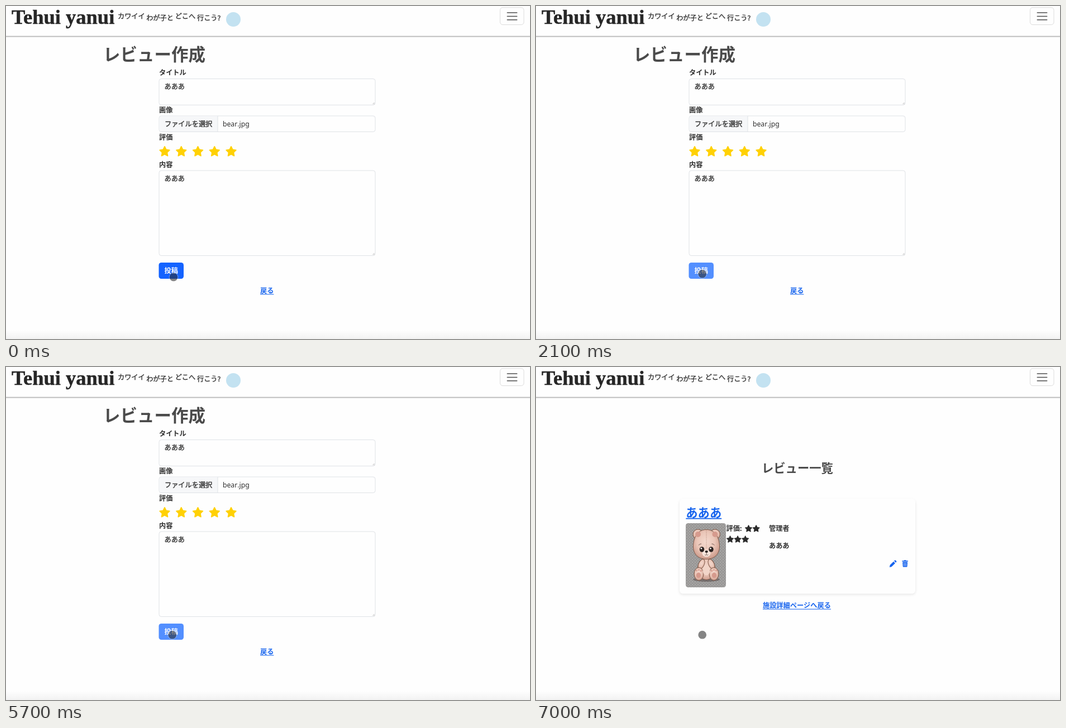
Recreate the animation shown at these times as an HTML page. Size 938x597 px, loop 7100 ms.

```html
<!DOCTYPE html>
<html lang="ja">
<head>
<meta charset="utf-8">
<title>レビュー作成</title>
<style>
html, body { margin: 0; width: 100%; height: 100%; overflow: hidden; background: #fefefe; }
svg { display: block; width: 938px; height: 597px; }
text { font: 500 12.2px "Noto Sans CJK JP", "Noto Sans CJK", "Noto Sans", sans-serif; fill: #303030; font-kerning: none; white-space: pre; }
.r { stroke: #303030; stroke-width: .35px; }
.b { font-weight: 700; }
.h1 { font-size: 30.5px; font-weight: 700; fill: #4a4a4a; }
.h2 { font-size: 21.3px; font-weight: 700; fill: #4a4a4a; }
.link { font-weight: 700; fill: #1764ee; }
.big { font-size: 21.3px; }
.latin { font-family: "Noto Sans", sans-serif; font-weight: 400; }
.logo { font: 700 36.5px "Liberation Serif", serif; fill: #262626; stroke: #262626; stroke-width: .5px; }
.white { font-weight: 700; fill: #fff; }
.box { fill: #fefefe; stroke: #dfe2e6; }
.grip { stroke: #999; stroke-width: .7; fill: none; }
</style>
</head>
<body>
<svg viewBox="0 0 938 597" xmlns="http://www.w3.org/2000/svg">
  <defs>
    <linearGradient id="fade" x2="0" y2="1">
      <stop offset="0" stop-color="#fefefe"/><stop offset="1" stop-color="#f2f2f2"/>
    </linearGradient>
    <filter id="soft" x="-5%" y="-10%" width="110%" height="125%"><feGaussianBlur stdDeviation="2.6"/></filter>
    <pattern id="mesh" width="5" height="5" patternUnits="userSpaceOnUse">
      <rect width="5" height="5" fill="#969594"/>
      <path d="M0 0L5 5M5 0L0 5" stroke="#aeacaa" stroke-width=".9"/>
    </pattern>
    <clipPath id="frame"><rect x="268" y="280" width="72" height="115" rx="4.5"/></clipPath>
    <radialGradient id="fur" cx=".48" cy=".42" r=".62">
      <stop offset="0" stop-color="#f4d9ce"/><stop offset=".55" stop-color="#eac6b8"/><stop offset="1" stop-color="#c99686"/>
    </radialGradient>
  </defs>
  <rect width="938" height="597" fill="#fefefe"/>
  <rect y="581" width="938" height="16" fill="url(#fade)"/>
  <rect y="53.6" width="938" height="2" fill="#bebebe"/>
  <text class="logo" x="10" y="32">Tehui yanui</text>
  <g id="tagline"></g>
  <circle cx="407" cy="24" r="13" fill="#c3e2f1"/>
  <rect x="884.5" y="2.800" width="42.500" height="30.700" rx="4.500" fill="#fefefe" stroke="#dcdcdc"/>
  <path d="M897.300 12h17.400M897.300 18.400h17.400M897.300 24.800h17.400" stroke="#4c4c4c" stroke-width="1.500" stroke-linecap="round"/>

  <g id="form">
    <rect class="box" x="274" y="130.5" width="387" height="47" rx="4"/>
    <rect class="box" x="274" y="197" width="387" height="28.5" rx="4"/>
    <path d="M379 197.5H278a3.5 3.5 0 0 0-3.5 3.5v20.5a3.5 3.5 0 0 0 3.5 3.5h101z" fill="#f6f7f9"/>
    <path d="M379 197v28.5" stroke="#dfe2e6"/>
    <rect class="box" x="274" y="295" width="387" height="152.5" rx="4"/>
    <path class="grip" d="M656.5 176l3-3M658.5 176.3l1.2-1.2M656.5 446l3-3M658.5 446.3l1.2-1.2"/>
    <g id="formText"></g>
    <rect id="button" x="273.5" y="460" width="44.5" height="29" rx="4.5"/>
    <text class="white" x="283.5" y="479.2">投稿</text>
  </g>

  <g id="list">
    <rect x="257" y="238.5" width="422" height="169.5" rx="6" fill="#000" opacity=".1" filter="url(#soft)"/>
    <rect x="257" y="236" width="422" height="170.5" rx="6" fill="#fefefe"/>
    <g id="listText"></g>
    <g fill="#1764ee">
      <path d="M632.800 359l.9-3.900 6.300-6.300 3 3-6.300 6.300zM641 347.800l1.200-1.200q.8-.6 1.600.1l1.300 1.300q.7.800 0 1.600l-1.200 1.200z"/>
      <path d="M655.300 347.200h3l.8-1h3l.8 1h3v1.600h-10.600zM656.200 349.600h8.800l-.5 7.800q-.1 1.200-1.300 1.200h-5.200q-1.200 0-1.300-1.200z"/>
      <path d="M658.600 351.200v5.700M660.600 351.200v5.700M662.600 351.200v5.700" stroke="#fff" stroke-width=".6"/>
    </g>
    <g id="plain"></g>
    <g id="loaded">
      <g clip-path="url(#frame)">
        <rect x="268" y="280" width="72" height="115" fill="url(#mesh)"/>
        <ellipse cx="305" cy="381" rx="24" ry="4" fill="#5c5350" opacity=".6"/>
        <g fill="url(#fur)" stroke="#75503f" stroke-width=".9">
          <circle cx="290" cy="300" r="9"/><circle cx="320.500" cy="300" r="9"/>
          <ellipse cx="305" cy="362" rx="15.500" ry="19.500"/>
          <ellipse cx="296" cy="353.500" rx="5" ry="9.500" transform="rotate(25 296 353.500)"/>
          <ellipse cx="314" cy="353.500" rx="5" ry="9.500" transform="rotate(-25 314 353.500)"/>
          <ellipse cx="291.500" cy="371" rx="8.500" ry="11.500"/><ellipse cx="318.500" cy="371" rx="8.500" ry="11.500"/>
          <path d="M305 291.500c13 0 21 10 23 24 3 18-7 29-23 29s-26-11-23-29c2-14 10-24 23-24z"/>
        </g>
        <g fill="#d69a8d">
          <circle cx="290" cy="300" r="5"/><circle cx="320.500" cy="300" r="5"/>
          <ellipse cx="291" cy="373.500" rx="4.200" ry="5"/><ellipse cx="319" cy="373.500" rx="4.200" ry="5"/>
          <circle cx="287.500" cy="365" r="1.400"/><circle cx="291.500" cy="363.800" r="1.400"/><circle cx="295.300" cy="365.500" r="1.400"/>
          <circle cx="314.700" cy="365.500" r="1.400"/><circle cx="318.500" cy="363.800" r="1.400"/><circle cx="322.500" cy="365" r="1.400"/>
        </g>
        <ellipse cx="305" cy="365" rx="6.500" ry="8.500" fill="#f2d5c8"/>
        <path d="M305 293v32" stroke="#a57a6a" stroke-width=".7" stroke-dasharray="1.500 1.500"/>
        <ellipse cx="305" cy="334" rx="7.500" ry="6.300" fill="#f8e6dd"/>
        <g fill="#2b2220">
          <ellipse cx="297" cy="327" rx="4.200" ry="4.800"/><ellipse cx="313.500" cy="327" rx="4.200" ry="4.800"/>
          <ellipse cx="305.200" cy="331" rx="2.700" ry="1.900"/>
        </g>
        <circle cx="295.900" cy="325.300" r="1.400" fill="#fff"/><circle cx="312.400" cy="325.300" r="1.400" fill="#fff"/>
        <path d="M305.200 333v3.500m-3.200 0q1.600 2 3.200 0q1.600 2 3.200 0M291 319.500q2-2.500 5-2.500M314.500 317q3 0 5 2.500" fill="none" stroke="#59403a" stroke-width=".8"/>
      </g>
    </g>
  </g>
  <g id="pointer">
    <circle r="7.400" fill="#282828" fill-opacity=".57"/>
    <circle r="7.900" fill="none" stroke="#fff" stroke-opacity=".35"/>
  </g>
</svg>
<script>
const LOOP = 7100, PRESS = 1200, SWITCH = 5900, IMAGE = 6200;
const $ = id => document.getElementById(id);

function add(parent, tag, attrs, content) {
  const el = document.createElementNS("http://www.w3.org/2000/svg", tag);
  for (const k in attrs) el.setAttribute(k, attrs[k]);
  if (content) el.textContent = content;
  $(parent).appendChild(el);
}
const label = (parent, x, y, str, cls = "b") => add(parent, "text", { x, y, class: cls }, str);

function star(parent, cx, cy, r, fill) {
  let d = "";
  for (let i = 0; i < 10; i++) {
    const a = i * Math.PI / 5 - Math.PI / 2, q = i % 2 ? r * .5 : r;
    d += (i ? "L" : "M") + (cx + q * Math.cos(a)).toFixed(2) + " " + (cy + q * Math.sin(a)).toFixed(2);
  }
  add(parent, "path", { d: d + "Z", fill, stroke: fill, "stroke-width": r * .2, "stroke-linejoin": "round" });
}

function link(parent, x, y, str, size = 12.2) {
  label(parent, x, y, str, size > 20 ? "link big" : "link");
  add(parent, "rect", { x, y: y + size * .1, width: str.length * size, height: size * .085, fill: "#1764ee" });
}

// Rating, author and comment; `first` stars fit on the top row
function review(parent, x, first, textX) {
  label(parent, x, 294, "評価:");
  for (let i = 0; i < 5; i++) {
    const top = i < first;
    star(parent, top ? x + 40 + i * 13.6 : x + 7 + (i - first) * 13.6, top ? 290 : 309.2, 6.2, "#2b2b2b");
  }
  label(parent, textX, 294, "管理者");
  label(parent, textX, 325.3, "あああ");
}

label("tagline", 200, 23.3, "カワイイ", "r");
label("tagline", 251.2, 26, "わが子と", "r");
label("tagline", 302.7, 23.3, "どこへ", "r");
label("tagline", 342, 26, "行こう?", "r");

label("formText", 174, 97.5, "レビュー作成", "h1");
label("formText", 274, 124, "タイトル");
label("formText", 283.5, 149.2, "あああ", "r");
label("formText", 274, 191.2, "画像");
label("formText", 284, 216, "ファイルを選択", "r");
label("formText", 388, 215.8, "bear.jpg", "latin");
label("formText", 274, 239.6, "評価");
for (let i = 0; i < 5; i++) star("formText", 284 + i * 29.75, 261.2, 9.2, "#ffd104");
label("formText", 274, 288.6, "内容");
label("formText", 283.5, 313.8, "あああ", "r");
link("formText", 455, 515.2, "戻る");

label("listText", 404, 189, "レビュー一覧", "h2");
link("listText", 268.3, 268.7, "あああ", 21.3);
link("listText", 406, 432.4, "施設詳細ページへ戻る");
review("plain", 268, 3, 359);
review("loaded", 340.5, 2, 417);

const ramp = (t, from, len) => Math.min(1, Math.max(0, (t - from) / len));
const show = (id, on) => $(id).setAttribute("visibility", on ? "visible" : "hidden");
const mix = (a, b, k) => "rgb(" + a.map((v, i) => Math.round(v + (b[i] - v) * k)) + ")";

function draw(t) {
  const listed = t >= SWITCH, pic = t >= IMAGE;
  show("form", !listed);
  show("list", listed);
  show("plain", listed && !pic);
  show("loaded", listed && pic);
  const k = ramp(t, 50, 450), e = k * k * (3 - 2 * k);
  $("pointer").setAttribute("transform", `translate(${300 - 2.3 * e} ${486 - 5.8 * e})`);
  $("button").setAttribute("fill", mix([20, 99, 255], [83, 143, 255], ramp(t, PRESS, 150)));
}

const start = performance.now();
function tick() {
  draw((performance.now() - start) % LOOP);
  requestAnimationFrame(tick);
}
tick();
</script>
</body>
</html>
```
